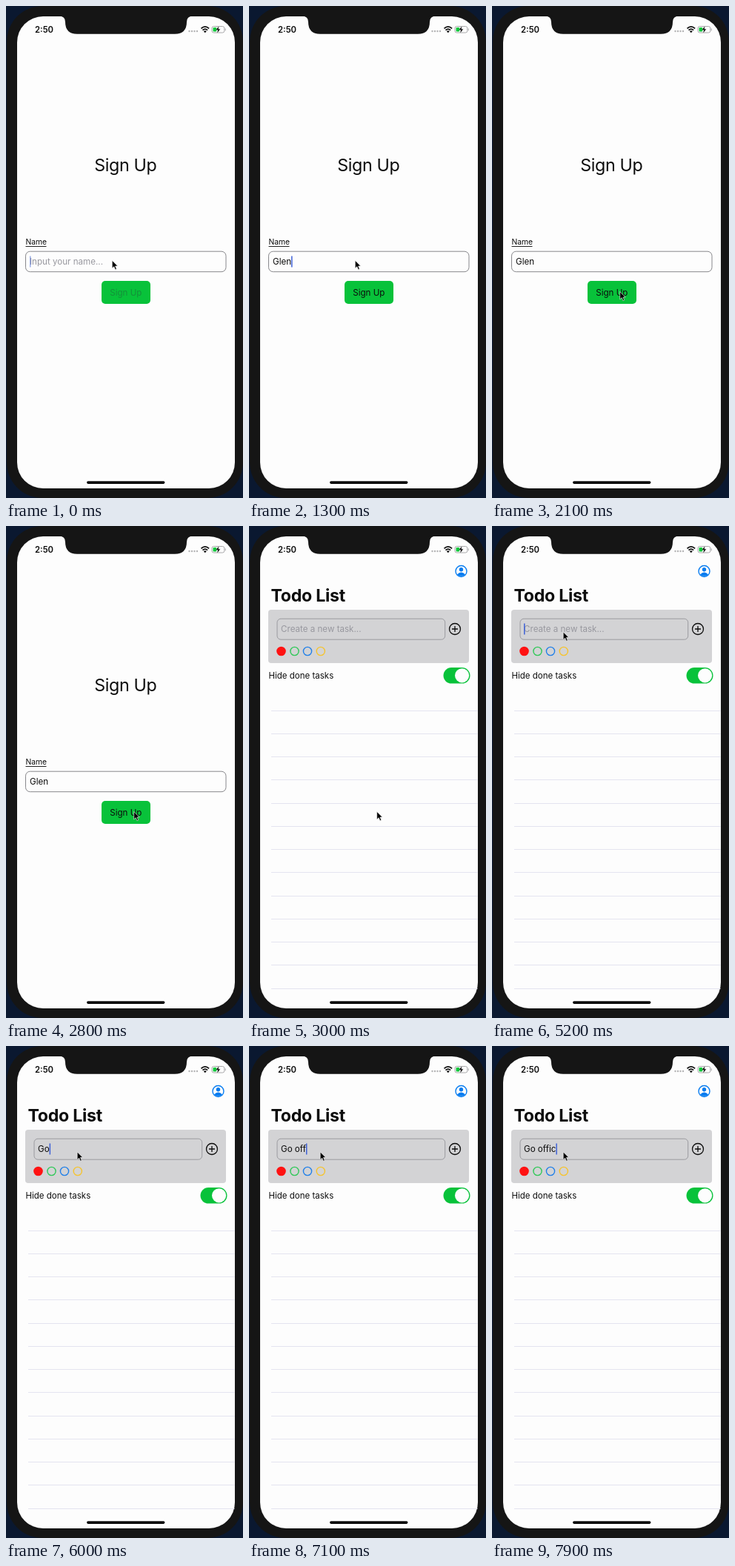
Recreate the animation shown at these times as an HTML page. Size 320 by 664 pixels, loop 8000 ms.

```html
<!DOCTYPE html>
<html lang="en">
<head>
<meta charset="utf-8">
<title>Sign up and todo list</title>
<style>
html, body { margin: 0; width: 100%; height: 100%; overflow: hidden; background: #0a1830; }
svg { display: block; width: 100vw; height: 100vh; }
text { font: 11.6px Inter, "Liberation Sans", sans-serif; font-optical-sizing: none; fill: #0c0c0c; white-space: pre; }
.line { fill: none; stroke: #0c0c0c; stroke-width: 1.3; }
.caret { fill: #3f62d8; }
.hint { fill: #98989f; }
</style>
</head>
<body>
<svg viewBox="0 0 320 664">
  <rect x="1" width="319" height="664" rx="48" fill="#151515"/>
  <rect x="15" y="14" width="294" height="637" rx="35" fill="#fdfdfd"/>
  <path d="M72 13.5Q80 14 80 21.5Q80 37.700 96 37.700H228Q244 37.700 244 21.5Q244 14 252 13.500Z" fill="#151515"/>

  <text x="39" y="35.500" style="font-size:11.300px;font-weight:600">2:50</text>
  <g fill="#b4b4b6">
    <circle cx="247.500" cy="34" r="1.200"/><circle cx="251" cy="34" r="1.200"/>
    <circle cx="254.500" cy="34" r="1.200"/><circle cx="258" cy="34" r="1.200"/>
  </g>
  <g class="line" style="stroke-width:1.800">
    <path d="M263.500 30.300Q268.800 25.500 274.100 30.300M265.500 32.600Q268.800 29.700 272.100 32.600"/>
  </g>
  <path d="M266.800 34Q268.800 32.400 270.800 34L268.800 36.200Z" fill="#0c0c0c"/>
  <rect x="278" y="27.500" width="16.800" height="8.500" rx="2.400" fill="none" stroke="#a8a8aa"/>
  <path d="M296.200 30.300v3" stroke="#a8a8aa"/>
  <rect x="279.500" y="29" width="4.800" height="5.500" rx="1" fill="#10c83c"/>
  <path d="M287.300 27.500L283.500 32.300H286L285.300 36.300L289.200 31.200H286.700Z" fill="#0c0c0c"/>

  <g id="signup">
    <text x="161.300" y="223" text-anchor="middle" style="font-size:23.300px;letter-spacing:-.4px">Sign Up</text>
    <text x="26.500" y="322" style="font-size:10.300px">Name</text>
    <path d="M26.500 324.500H54.500" stroke="#0c0c0c" stroke-width=".9"/>
    <rect x="26.500" y="331.200" width="270.500" height="27.500" rx="6" fill="none" stroke="#88888c"/>
    <text id="name" x="32" y="348.700"></text>
    <rect id="nameCaret" class="caret" y="337.500" width="1.500" height="15"/>
    <rect x="129" y="371" width="66" height="31" rx="5" fill="#08c23a"/>
    <text id="submit" x="161.800" y="390.800" text-anchor="middle">Sign Up</text>
  </g>

  <g id="todo">
    <circle cx="286.500" cy="61" r="7.500" fill="none" stroke="#087cf0" stroke-width="1.400"/>
    <circle cx="286.500" cy="58.700" r="2.700" fill="#087cf0"/>
    <path d="M281 65.500Q286.500 59.500 292 65.500Q286.500 70 281 65.500Z" fill="#087cf0"/>
    <text x="29.500" y="102" style="font-size:23.200px;font-weight:700;letter-spacing:-.3px">Todo List</text>
    <rect x="26" y="113" width="271" height="72" rx="4" fill="#d3d3d5"/>
    <rect x="38" y="125.200" width="226.700" height="28" rx="5" fill="none" stroke="#9a9a9f"/>
    <text id="task" x="43" y="143.200"></text>
    <rect id="taskCaret" class="caret" y="131.500" width="1.500" height="15"/>
    <g class="line">
      <circle cx="278" cy="139" r="7.500"/>
      <path d="M274 139h8M278 135v8"/>
    </g>
    <g fill="none" stroke-width="1.400">
      <circle cx="43.500" cy="169" r="5.600" fill="#ff1212" stroke="#ff1212"/>
      <circle cx="61.500" cy="169" r="5.600" stroke="#30c858"/>
      <circle cx="79" cy="169" r="5.600" stroke="#2280e8"/>
      <circle cx="96.800" cy="169" r="5.600" stroke="#f5c430"/>
    </g>
    <text x="26.500" y="206" style="font-size:11.500px">Hide done tasks</text>
    <rect x="262.500" y="191" width="36" height="21.600" rx="10.800" fill="#08c23a"/>
    <circle cx="287.600" cy="201.800" r="9.600" fill="#fdfdfd"/>
    <path id="rules" stroke="#e4e4f0" fill="none"/>
  </g>

  <rect x="109" y="641.300" width="105.500" height="3.600" rx="1.800" fill="#0c0c0c"/>
  <path id="pointer" d="M0 0V10.400L2.500 8.200L4.200 12.200L6 11.400L4.300 7.500H7.500Z" fill="#000" stroke="#fdfdfd" stroke-width=".6"/>
</svg>
<script>
const $ = id => document.getElementById(id);
const clamp = x => Math.max(0, Math.min(1, x));
const ramp = (t, from, to) => clamp((t - from) / (to - from));
const ease = x => x * x * (3 - 2 * x);

const nameField = {
  text: $('name'), caret: $('nameCaret'), x: 32,
  value: 'Glen', hint: 'Input your name...', keys: [500, 800, 1000, 1200]
};
const taskField = {
  text: $('task'), caret: $('taskCaret'), x: 43,
  value: 'Go offic', hint: 'Create a new task...',
  keys: [5700, 5900, 6200, 6600, 6900, 7100, 7500, 7800]
};
const stops = [[143.3, 343.5], [172.7, 385.5], [96.2, 143]];

$('rules').setAttribute('d', Array.from({ length: 13 }, (_, i) =>
  `M30 ${Math.floor(249 + i * 31.25) + .5}H308.5`).join(''));

function drawField(f, t, caretAlpha) {
  const typed = f.value.slice(0, f.keys.filter(k => k <= t).length);
  const shown = typed || f.hint;
  if (f.text.textContent !== shown) f.text.textContent = shown;
  f.text.classList.toggle('hint', !typed);
  f.caret.setAttribute('x', f.x + (typed ? f.text.getComputedTextLength() : 0));
  f.caret.setAttribute('opacity', caretAlpha);
  return typed;
}

function draw(t) {
  const second = t >= 3000;
  $('signup').style.display = second ? 'none' : '';
  $('todo').style.display = second ? '' : 'none';

  if (second) {
    drawField(taskField, t, ramp(t, 4700, 4800));
  } else {
    const alpha = .5 + .5 * ramp(t, 0, 100) - ramp(t, 1600, 1900)
      + ramp(t, 2100, 2300) - ramp(t, 2500, 2800);
    const typed = drawField(nameField, t, clamp(alpha));
    $('submit').style.fill = typed ? '#0c0c0c' : '#14903a';
  }

  const a = ease(ramp(t, 1400, 2000)), b = ease(ramp(t, 3200, 4300));
  const [x, y] = [0, 1].map(i => stops[0][i]
    + (stops[1][i] - stops[0][i]) * a + (stops[2][i] - stops[1][i]) * b);
  $('pointer').setAttribute('transform', `translate(${x} ${y})`);
}

const start = performance.now();
function tick() {
  draw((performance.now() - start) % 8000);
  requestAnimationFrame(tick);
}
tick();
</script>
</body>
</html>
```
